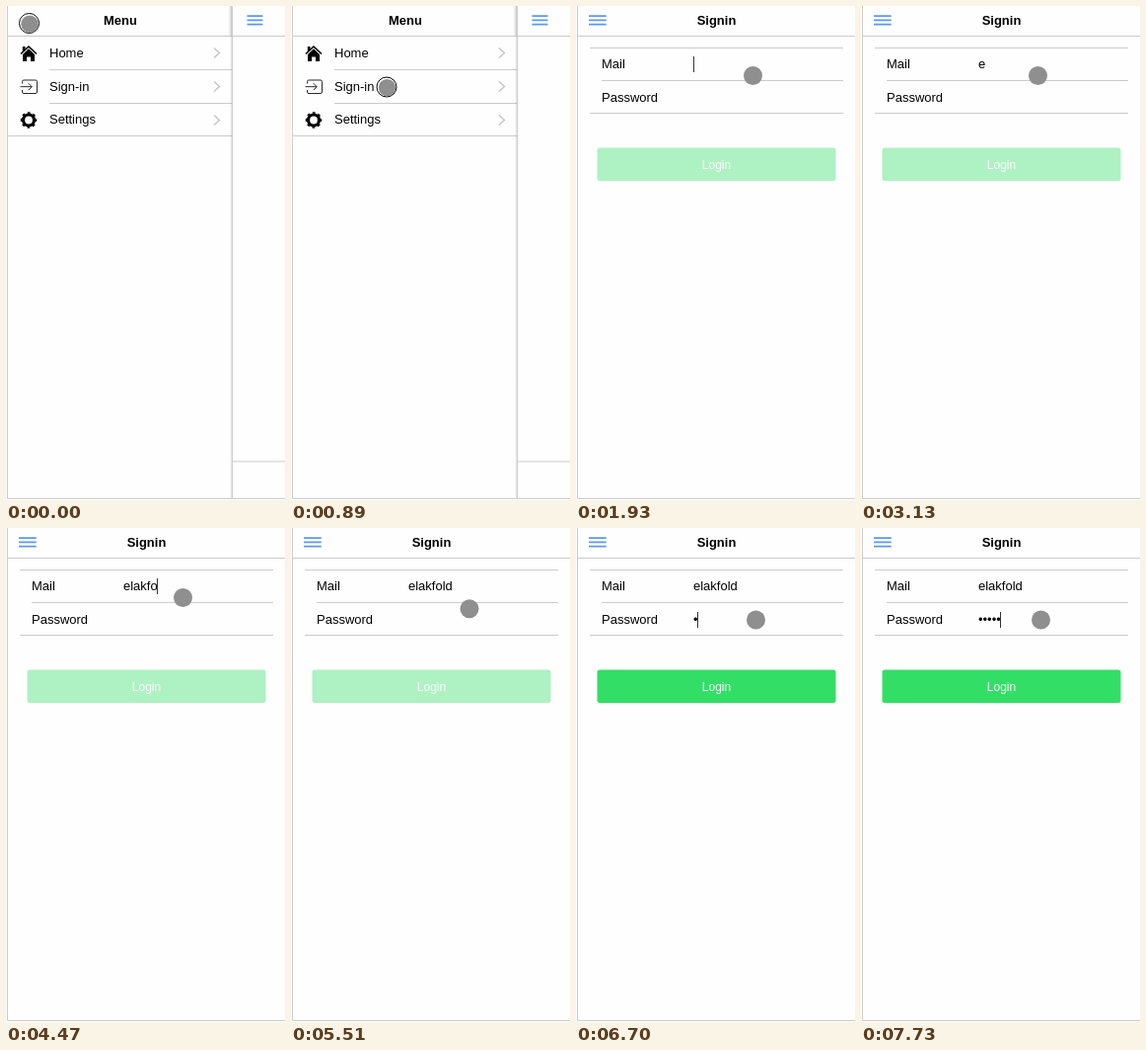
Write an HTML page that moves like this. It is 283 by 500 pixels and loops after 8000 ms.

```html
<!DOCTYPE html>
<html lang="en">
<head>
<meta charset="utf-8">
<title>Menu and sign-in</title>
<style>
html, body { margin: 0; width: 100%; height: 100%; overflow: hidden; background: #fefefe; }
svg { display: block; width: 283px; height: 500px; font: 13px "Liberation Sans", Arial, sans-serif; }
.title { font-weight: bold; text-anchor: middle; }
.line { stroke: #cbcbcb; fill: none; }
.bars { stroke: #5b98f5; stroke-width: 1.7; }
.chevron { stroke: #c4c4c8; stroke-width: 1.4; fill: none; }
.thin { stroke: #2a2a2a; fill: none; }
</style>
</head>
<body>
<svg viewBox="0 0 283 500">
  <defs>
    <linearGradient id="fade">
      <stop offset="0" stop-color="#000" stop-opacity="0"/>
      <stop offset="1" stop-color="#000" stop-opacity=".16"/>
    </linearGradient>
    <path id="chevron" class="chevron" d="M211 -5l5.500 5l-5.500 5"/>
  </defs>
  <rect width="283" height="500" fill="#fefefe"/>

  <g id="menu">
    <path class="line" d="M2 30.500H230M44 64.500H230M44 98.500H230M2 131.500H230"/>
    <text class="title" x="116" y="19">Menu</text>
    <text x="44" y="52">Home</text>
    <text x="44" y="86">Sign-in</text>
    <text x="44" y="119">Settings</text>
    <use href="#chevron" y="47.500"/>
    <use href="#chevron" y="81.500"/>
    <use href="#chevron" y="115.500"/>
    <path d="M17 49L23 43.200L29 49V56H25V51.500H21V56H17zM16.800 41h2.700v3l-2.700 2.500z"/>
    <path d="M15 48.500L23 41L31 48.500" fill="none" stroke="#000" stroke-width="1.600"/>
    <path class="thin" d="M16.500 78.500v-2q0-1.500 1.500-1.500h12q1.500 0 1.500 1.500v10.500q0 1.500-1.500 1.500h-12q-1.500 0-1.500-1.500v-2M14.500 81.700h11.500M22.700 78.200l3.500 3.500l-3.500 3.500"/>
    <g transform="translate(23 115.500)" fill="none" stroke="#000">
      <circle r="5.500" stroke-width="3.200"/>
      <circle r="7.500" stroke-width="1.500" stroke-dasharray="2.900 2.990" stroke-dashoffset="1.450"/>
    </g>
  </g>

  <g id="page">
    <g id="shade" fill="url(#fade)">
      <rect x="-1" width="3" height="498"/>
      <rect x="-3" width="5" height="30"/>
    </g>
    <rect x="2" width="283" height="498" fill="#fefefe"/>
    <path class="line" d="M2 30.500H285M1.500 0V498"/>
    <g id="home">
      <path class="bars" d="M16.500 10.200h16M16.500 14.400h16M16.500 18.600h16"/>
      <path class="line" d="M2 461H285"/>
    </g>
    <g id="signin">
      <path class="bars" d="M13 10.100h17.700M13 14.400h17.700M13 18.700h17.700"/>
      <text class="title" x="142.500" y="19">Signin</text>
      <path class="line" d="M14 42.500H271M26 75.500H271M14 108.500H271"/>
      <text x="26" y="63">Mail</text>
      <text x="26" y="97">Password</text>
      <text id="mail" x="119" y="63"></text>
      <text id="pass" x="119" y="97"></text>
      <rect id="caret" width="1" height="16" fill="#333"/>
      <g id="button">
        <rect x="21.500" y="143.500" width="242" height="33.500" rx="2.500" fill="#33de66"/>
        <text x="142.500" y="164.500" font-size="12" fill="#fff" text-anchor="middle">Login</text>
      </g>
    </g>
  </g>

  <path class="line" d="M1.500 0V498.500H283"/>
  <g id="cursor">
    <circle id="ring" r="10" fill="#fff" stroke="#000"/>
    <circle id="dot" fill="#8f8f8f"/>
  </g>
</svg>
<script>
// The picture advances in ticks; all moments below are counted in them.
const LOOP = 8000, TICK = 148.7;
const el = id => document.getElementById(id);
const show = (id, on) => el(id).setAttribute('visibility', on ? 'inherit' : 'hidden');
const set = (id, attrs) => {
  for (const key in attrs) el(id).setAttribute(key, attrs[key]);
};
const clamp = (v, lo = 0, hi = 1) => Math.min(hi, Math.max(lo, v));
const progress = (n, start, end) => clamp((n - start) / (end - start));
const smooth = p => p * p * (3 - 2 * p);

// The pointer glides to each stop and presses on arrival.
const stops = [
  { x: 23.5, y: 17.5, start: -1, end: 0 },
  { x: 97, y: 82, start: 2, end: 6 },
  { x: 179.5, y: 70.5, start: 8, end: 11 },
  { x: 182.5, y: 93, start: 36, end: 38 }
];
const mail = {
  id: 'mail', word: 'elakfold', focus: 13, top: 51,
  count: n => n < 18 ? 0 : 1 + clamp(Math.round((n - 23) * .75), 0, 7)
};
const pass = {
  id: 'pass', word: '•••••', focus: 40, top: 85,
  count: n => clamp(Math.floor((n - 42) / 2), 0, 5)
};

function drawPointer(n) {
  let { x, y } = stops[0];
  for (const stop of stops) {
    const p = smooth(progress(n, stop.start, stop.end));
    x += (stop.x - x) * p;
    y += (stop.y - y) * p;
  }
  const down = stops.some(stop => stop.end === n);
  set('cursor', { transform: `translate(${x} ${y})` });
  show('ring', down);
  set('dot', { r: down ? 8.7 : 9.5, cx: down ? .5 : 0, cy: down ? .7 : 0 });
}

// The caret restarts its blink at focus and at every key.
function drawCaret(n, field) {
  let last = Math.max(n, field.focus);
  while (last > field.focus && field.count(last) === field.count(last - 1)) last--;
  show('caret', n >= field.focus && (n - last) % 6 < 3);
  const width = field.count(n) && el(field.id).getComputedTextLength();
  set('caret', { x: Math.floor(119 + width), y: field.top });
}

function draw(t) {
  const n = Math.floor((t + 5) / TICK);
  const x = 228 * (1 - progress(n, 6, 9)) ** 2.54;
  set('page', { transform: `translate(${x} 0)` });
  show('menu', x > 0);
  show('shade', x > 0);
  show('home', n < 7);
  show('signin', n >= 7);

  for (const { id, word, count } of [mail, pass]) {
    el(id).textContent = word.slice(0, count(n));
  }
  drawCaret(n, n < 38 ? mail : pass);
  set('button', { opacity: .39 + .61 * progress(n, 43, 45) });
  drawPointer(n);
}

function tick(now) {
  draw(now % LOOP);
  requestAnimationFrame(tick);
}
draw(0);
requestAnimationFrame(tick);
</script>
</body>
</html>
```
